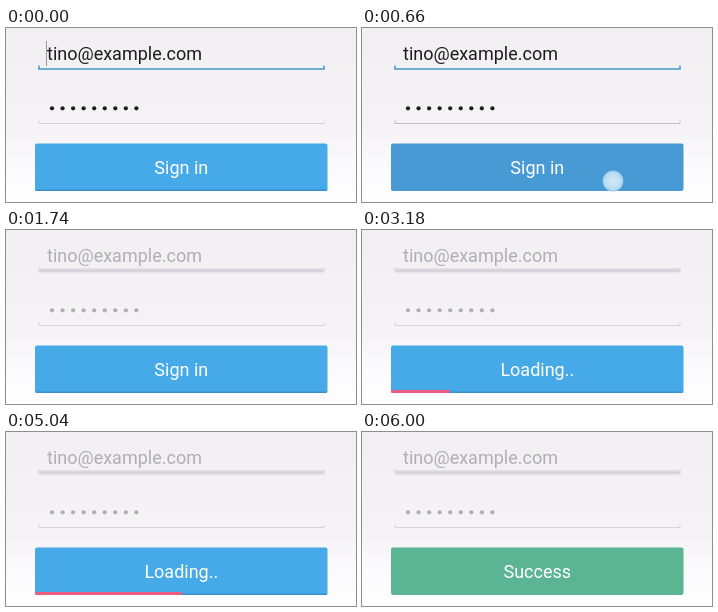
Recreate the animation shown at these times as an HTML page. Size 350 px wide and 174 px high, loop 6.18 s.

```html
<!DOCTYPE html>
<html lang="en">
<head>
<meta charset="utf-8">
<title>Sign in button</title>
<style>
  html, body { margin: 0; width: 100%; height: 100%; overflow: hidden; background: #f4f2f5; }
  svg { display: block; width: 350px; height: 174px; }
  text { font: 18px Roboto, sans-serif; }
  .label { fill: #fff; text-anchor: middle; }
</style>
</head>
<body>
<svg viewBox="0 0 350 174">
  <defs>
    <linearGradient id="sky" x2="0" y2="1">
      <stop stop-color="#f1eff2"/>
      <stop offset=".58" stop-color="#f5f3f6"/>
      <stop offset=".8" stop-color="#fbfafc"/>
      <stop offset="1" stop-color="#fefefe"/>
    </linearGradient>
    <radialGradient id="glow">
      <stop stop-color="#d0e9f8"/>
      <stop offset=".65" stop-color="#bfe0f4"/>
      <stop offset=".85" stop-color="#b0d8f0"/>
      <stop offset="1" stop-color="#8fc6ea"/>
    </radialGradient>
    <filter id="soft" filterUnits="userSpaceOnUse" x="25" y="30" width="300" height="20">
      <feGaussianBlur stdDeviation=".8"/>
    </filter>
    <clipPath id="round"><rect x="29" y="115.5" width="292.5" height="47.5" rx="2"/></clipPath>
  </defs>
  <rect width="350" height="174" fill="url(#sky)"/>

  <path id="shade" d="M33 40.5H318" stroke="#b4b2b7" stroke-width="3" filter="url(#soft)"/>
  <path id="mailLine" d="M33 37.5V41H318V37.5" fill="none"/>
  <path id="passLine" d="M33 92.5V95.5H318V92.5" fill="none"/>
  <text id="mail" x="41" y="32">tino@example.com</text>
  <g id="dots"></g>
  <rect id="caret" x="40" y="13" width="1" height="25" fill="#999"/>

  <g clip-path="url(#round)">
    <rect id="button" x="29" y="115" width="293" height="48"/>
    <rect id="edge" x="29" y="161.5" width="293" height="1.5" fill="#3b8fc9"/>
    <rect id="bar" x="29" y="160" height="3" fill="#ee5a80"/>
  </g>
  <text id="before" class="label" x="175.3" y="146"></text>
  <text id="after" class="label" x="175.3" y="146">Success</text>
  <circle id="touch" cx="251" cy="153" r="10.5" fill="url(#glow)"/>
</svg>
<script>
const LOOP = 6180, TICK = 60;
const $ = id => document.getElementById(id);
const set = (id, attrs) => {
  for (const key in attrs) $(id).setAttribute(key, attrs[key]);
};

// Each row is [start time, value], held until the next row.
const track = {
  touch: [[0, 0], [660, 1], [840, .9], [1020, .45], [1320, 0]],
  progress: [[0, 0], [2280, .1], [3180, .2], [4020, .3], [4200, .4], [5040, .5]],
  label: [[0, 'Sign in'], [2280, 'Loading..']]
};
const at = (rows, t) => rows.filter(row => row[0] <= t).pop()[1];
const mix = (a, b, k) => `rgb(${a.map((v, i) => Math.round(v + (b[i] - v) * k))})`;

const BLUE = [70, 170, 232], GREEN = [91, 181, 146];

for (let i = 0; i < 9; i++) {
  const dot = document.createElementNS('http://www.w3.org/2000/svg', 'circle');
  $('dots').append(dot);
  dot.setAttribute('cx', 46 + i * 10.55);
  dot.setAttribute('cy', 80.3);
  dot.setAttribute('r', 2.1);
}

function draw(time) {
  const t = Math.floor((time % LOOP) / TICK) * TICK;
  const disabled = t >= 720;
  const pressed = t >= 660 && t < 720;
  const done = Math.min(1, Math.max(0, (t - 5700) / 300));
  const ink = disabled ? '#b0aeb2' : '#1c1c1e';

  set('mail', { fill: ink });
  set('dots', { fill: ink });
  set('caret', { opacity: t < 480 ? 1 : 0 });
  set('shade', { opacity: disabled ? .6 : 0 });
  set('mailLine', {
    stroke: disabled ? '#d6d4d8' : '#429bc3',
    'stroke-width': disabled ? 1 : 1.5
  });
  set('passLine', { stroke: disabled || t < 480 ? '#d6d4d8' : '#c0bec2' });

  set('button', { fill: pressed ? '#489ad5' : mix(BLUE, GREEN, done) });
  set('edge', { opacity: pressed ? 0 : 1 - done });
  set('bar', { width: 293 * at(track.progress, t), opacity: 1 - done });
  $('before').textContent = at(track.label, t);
  set('before', { opacity: 1 - done });
  set('after', { opacity: done });
  set('touch', { opacity: at(track.touch, t) });
}

const start = performance.now();
function loop() {
  draw(performance.now() - start);
  requestAnimationFrame(loop);
}
loop();
</script>
</body>
</html>
```
